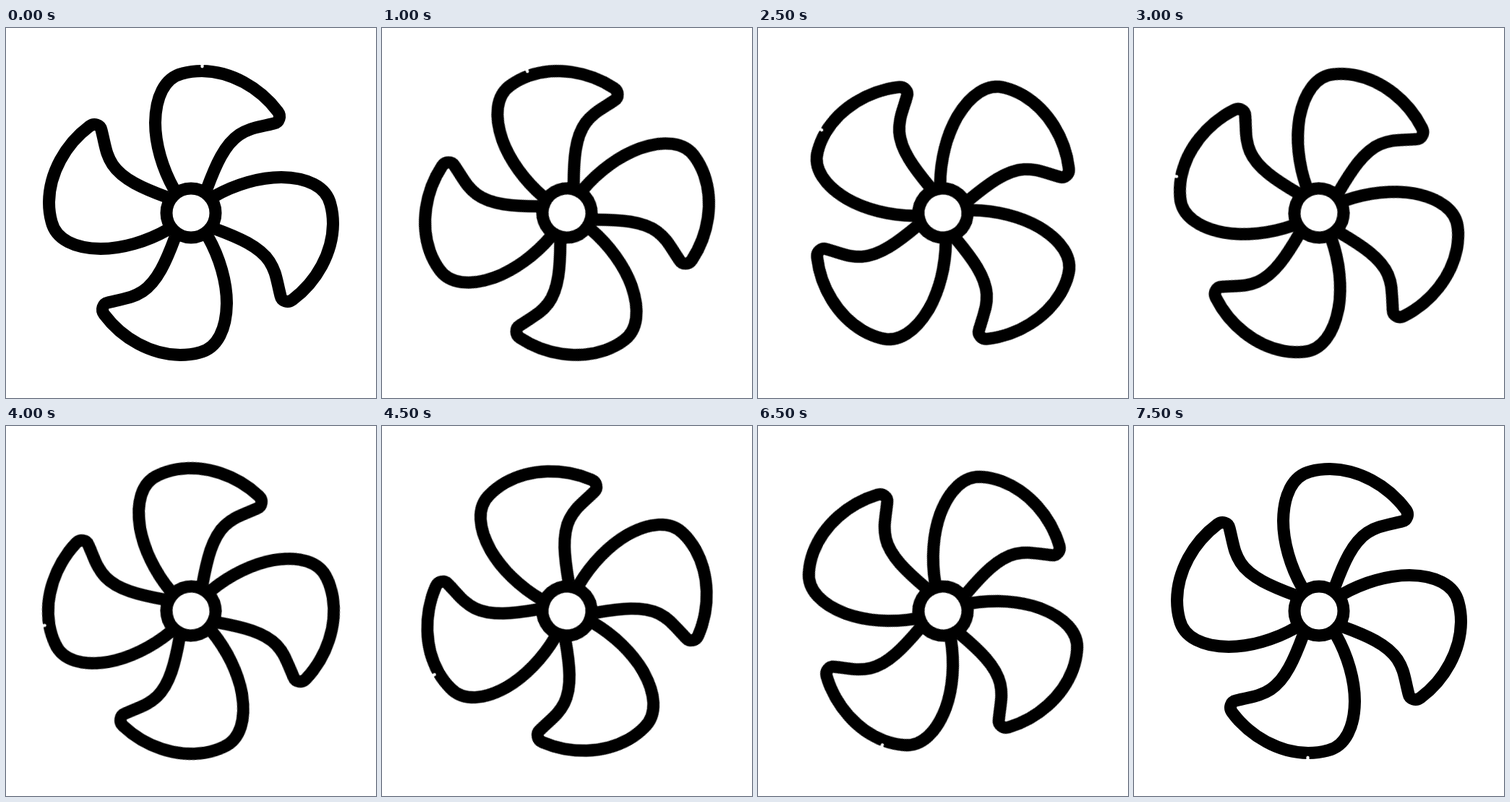
An HTML page for the animation above (8000 ms loop, 512 by 512 pixels).

```html
<!DOCTYPE html>
<html lang="en">
<head>
<meta charset="utf-8">
<title>Fan</title>
<style>
  html, body { margin: 0; width: 100%; height: 100%; overflow: hidden; background: #fff; }
  svg { display: block; width: 100vw; height: 100vh; }
  .fan {
    fill: none;
    stroke: #000;
    stroke-width: 17;
    transform-origin: 256px 256px;
    animation: spin 8s step-end infinite;
  }
  .spot { fill: #fff; stroke: none; }

  /* Sixteen held poses, 500 ms each */
  @keyframes spin {
    0%     { transform: rotate(0deg); }
    6.25%  { transform: rotate(-10deg); }
    12.5%  { transform: rotate(-20deg); }
    18.75% { transform: rotate(-30deg); }
    25%    { transform: rotate(-50deg); }
    31.25% { transform: rotate(-60deg); }
    37.5%  { transform: rotate(-80deg); }
    43.75% { transform: rotate(-90deg); }
    50%    { transform: rotate(-100deg); }
    56.25% { transform: rotate(-120deg); }
    62.5%  { transform: rotate(-130deg); }
    68.75% { transform: rotate(-140deg); }
    75%    { transform: rotate(-150deg); }
    81.25% { transform: rotate(-160deg); }
    87.5%  { transform: rotate(-170deg); }
    93.75%, 100% { transform: rotate(-180deg); }
  }
</style>
</head>
<body>
<svg viewBox="0 0 512 512">
  <defs>
    <path id="blade" d="M233 224 C216 194 206.500 160 206.500 131
      C207 96 219 69 244 63
      C253 60.500 262 59.500 271 59.500 C311 60 351 82 376 115.500
      C381 122 378 130.500 371 132 C347 138 338 138 323 147.500
      C302.500 161 290 190 278 222.500"/>
  </defs>
  <g class="fan">
    <use href="#blade"/>
    <use href="#blade" transform="rotate(90 256 256)"/>
    <use href="#blade" transform="rotate(180 256 256)"/>
    <use href="#blade" transform="rotate(270 256 256)"/>
    <circle cx="256" cy="256" r="34"/>
    <circle class="spot" cx="271.500" cy="53.300" r="2.100"/>
    <path class="spot" d="M268.500 50.500h6l-2 2.500h-2z"/>
  </g>
</svg>
</body>
</html>
```
